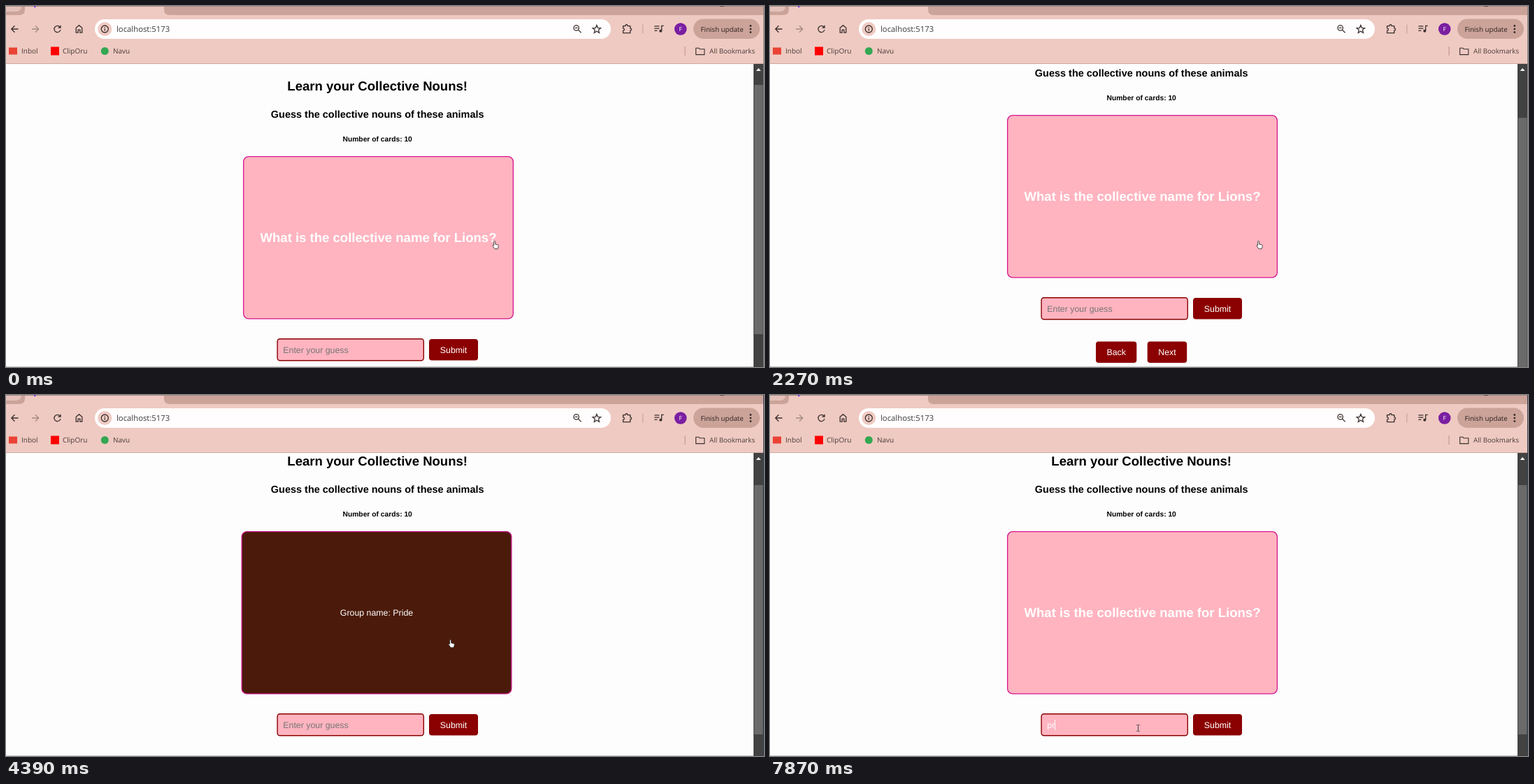
Animation, 1084 px wide and 517 px high, one loop 8 s. Source, as an HTML page:

```html
<!DOCTYPE html>
<html lang="en">
<head>
<meta charset="utf-8">
<title>Collective Nouns</title>
<style>
  html, body { margin: 0; width: 100%; height: 100%; overflow: hidden; background: #fdfdfd; }
  svg { display: block; width: 100vw; height: 100vh; text-rendering: geometricPrecision; }
  .page text { font: 12.37px "Liberation Sans", Arial, sans-serif; }
  .page .mid { text-anchor: middle; }
  .page .h2 { font-size: 18.56px; font-weight: bold; }
  .page .h3 { font-size: 14.48px; font-weight: bold; }
  .page .h5 { font-size: 10.27px; font-weight: bold; }
  .ui text { font: 10px "Open Sans", "Noto Sans", sans-serif; fill: #4a3b39; }
  .ui .url { font-size: 11.3px; fill: #3c3c3c; }
  .line { fill: none; stroke: #3b302f; stroke-width: 1.3; }
  .btn rect { fill: #8b0000; }
  .btn text { fill: #fff; }
</style>
</head>
<body>
<svg viewBox="0 0 1084 517" preserveAspectRatio="none">
  <defs>
    <clipPath id="view"><rect y="83" width="1069" height="434"/></clipPath>
  </defs>
  <rect width="1084" height="517" fill="#fdfdfd"/>

  <g class="page" clip-path="url(#view)">
    <g id="scroll">
      <text class="mid h2" x="531.2" y="121">Learn your Collective Nouns!</text>
      <text class="mid h3" x="531.2" y="160">Guess the collective nouns of these animals</text>
      <text class="mid h5" x="531.2" y="193.5">Number of cards: 10</text>

      <g id="card">
        <g id="front">
          <rect x="-191.6" y="215.6" width="385.7" height="232.3" rx="7.5" fill="#ffb4c0" stroke="#d6168f" stroke-width="1.3"/>
          <text class="mid h2" x="1.25" y="338" fill="#fff">What is the collective name for Lions?</text>
        </g>
        <g id="back">
          <rect x="-194.1" y="215.6" width="385.7" height="232.3" rx="7.5" fill="#4b1a0a" stroke="#c71585" stroke-width="1.3"/>
          <text class="mid" x="-1.25" y="335.8" fill="#fff">Group name: Pride</text>
        </g>
      </g>

      <rect x="388.1" y="476.7" width="209.2" height="31" rx="3.6" fill="#ffb4c0" stroke="#8b0000" stroke-width="1.4"/>
      <text id="hint" x="396.3" y="496.6" fill="#757575">Enter your guess</text>
      <text id="typed" x="396.3" y="496.6" fill="#fff"></text>
      <rect id="caret" y="485" width="1" height="15" fill="#fff"/>

      <g class="btn">
        <rect x="605" y="477" width="70" height="30.5" rx="4"/>
        <text class="mid" x="640" y="496.6">Submit</text>
        <rect x="466" y="539.5" width="58.3" height="30.5" rx="4"/>
        <text class="mid" x="495.2" y="559">Back</text>
        <rect x="539.7" y="539.5" width="56.5" height="30.5" rx="4"/>
        <text class="mid" x="568" y="559">Next</text>
      </g>
    </g>
  </g>

  <rect y="516" width="1069" height="1" fill="#c9c9c9"/>
  <rect x="1069" y="83" width="14" height="434" fill="#424242"/>
  <rect id="thumb" x="1070" width="12.5" height="357" fill="#6a6a6a"/>
  <path d="M1072.8 93l3.4-4 3.4 4z" fill="#fff"/>

  <g class="ui">
    <rect width="1084" height="82" fill="#efcac2"/>
    <rect y="82" width="1084" height="1" fill="#cdaaa4"/>
    <path d="M0 0h27v5q0 8-8 8H0z" fill="#cba399"/>
    <path d="M0 0h22q0 8-8 8H0z" fill="#e3c0b8"/>
    <path d="M226 0h858v13H234q-8 0-8-8z" fill="#cba399"/>
    <rect width="1084" height="1" fill="#a58a84"/>
    <rect x="40" width="2.5" height="2" fill="#7b3fe4"/>
    <rect x="1021" width="6" height="1" fill="#5b4b48"/>

    <path class="line" d="M17.5 33H8m4.5-4.7L7.8 33l4.7 4.7"/>
    <path class="line" d="M37 33h9.5m-4.5-4.7l4.7 4.7-4.7 4.7" style="stroke:#a58a85"/>
    <path class="line" d="M77.3 30.4a4.6 4.6 0 1 0 .7 3.8M78 27.8v3.4h-3.6"/>
    <path class="line" d="M100.2 38.2v-7l4.3-3.5 4.3 3.5v7h-2.9v-4h-2.8v4z"/>

    <rect x="127" y="19" width="738" height="28" rx="14" fill="#fffdfd"/>
    <circle cx="141.3" cy="33" r="10" fill="#efcac2"/>
    <circle class="line" cx="141.3" cy="33" r="5"/>
    <path class="line" d="M141.3 32.4v3.2m0-5.4v1.2"/>
    <text class="url" x="158" y="36.8">localhost:5173</text>
    <g class="line">
      <circle cx="815.6" cy="31.4" r="3.7"/>
      <path d="M818.4 34.2l4.2 4.2M813.7 31.4h3.8"/>
      <path d="M844.8 27.4l1.6 3.9 4.2.3-3.2 2.7 1 4.1-3.6-2.2-3.6 2.2 1-4.1-3.2-2.7 4.2-.3z"/>
      <path d="M882.5 28.7h3.2c0-2.6 3.4-2.6 3.4 0h3.6v3.2c2.4 0 2.4 3.3 0 3.3v3.5h-10.2v-3.3c2.4 0 2.4-3.5 0-3.5z"/>
      <path d="M927.3 28.9h7m-7 3.2h7m-7 3.2h4M937.6 35.4v-7h3"/>
    </g>
    <circle cx="936.2" cy="35.7" r="2" fill="#3b302f"/>
    <rect x="910.3" y="26.5" width="1" height="13" fill="#c69b92"/>
    <circle cx="964.7" cy="33" r="8.8" fill="#7a1fa2"/>
    <text x="964.7" y="36.2" text-anchor="middle" style="font-size:8.5px;fill:#fff">F</text>
    <rect x="983" y="18.5" width="95" height="28.5" rx="14.2" fill="#cba399"/>
    <text x="993.4" y="36.5" style="font-size:9.75px;fill:#2d2120">Finish update</text>
    <g fill="#2d2120">
      <circle cx="1064.8" cy="28.4" r="1.35"/><circle cx="1064.8" cy="33" r="1.35"/><circle cx="1064.8" cy="37.6" r="1.35"/>
    </g>

    <rect x="4" y="59.5" width="12" height="10" fill="#ea4335"/>
    <text x="22" y="68">Inbol</text>
    <rect x="64" y="58.5" width="12" height="12" fill="#f00"/>
    <text x="81" y="68">ClipOru</text>
    <circle cx="141.3" cy="64.5" r="5.5" fill="#34a853"/>
    <text x="153" y="68">Navu</text>
    <rect x="970.5" y="58" width="1" height="13" fill="#c08f86"/>
    <path class="line" d="M986.6 60.3h4.2l1.4 1.5h6.6v7.8h-12.2z" style="stroke-width:1.1"/>
    <text x="1006" y="68" style="font-size:9.75px">All Bookmarks</text>
  </g>
  <rect id="edge" x="1083" width="1" height="517"/>

  <path id="hand" fill="#fff" stroke="#222" stroke-width=".8" stroke-linejoin="round"
    d="M-1.4-5.4c.8 0 1.1.5 1.1 1.1v3.4l3.6.9c.8.2 1.1.7 1 1.5l-.5 2.5-.8 1.8H-1L-4 1.6c-.5-.8.4-1.5 1.1-1l.5.5v-5.4c0-.6.3-1.1 1-1.1z"/>
  <path id="beam" fill="none" stroke="#4d4245" stroke-width="1" d="M-2.3-4.5h1.6l.7.5.7-.5h1.6M0-4v8M-2.3 4.5h1.6l.7-.5.7.5h1.6"/>
</svg>
<script>
const LOOP = 8000, FLIP = 600;
const $ = id => document.getElementById(id);

// Each row: start time, then the value held from there on.
const scrolls = [[0, 0], [630, 3], [750, 9], [870, 18], [1020, 45], [1140, 61],
  [2270, 59], [2390, 48], [2510, 33], [2660, 20]];
const pointer = [[0, 700, 342], [3080, 668, 350], [3210, 637, 356], [5410, 575, 403],
  [5530, 552, 431], [5650, 540, 451], [5770, 533.5, 465], [5920, 527, 477], [6070, 526.5, 477]];
const carets = [[0, 0], [6210, 396], [6730, 0], [7230, 396], [7480, 403], [7870, 407]];
const typing = [[0, ""], [7480, "p"], [7870, "pr"]];
const turns = [[0, 0], ...[3910, 4030, 4150, 4270, 4390].map(t => [t, 180 * ease((t - 3778) / FLIP)]),
  ...[5270, 5410, 5530, 5650, 5770].map(t => [t, 180 - 180 * ease((t - 5176) / FLIP)])];

// CSS "ease": cubic-bezier(.25, .1, .25, 1)
function ease(x) {
  if (x <= 0) return 0;
  if (x >= 0.98) return 1;
  const curve = (a, b, u) => 3 * a * u * (1 - u) ** 2 + 3 * b * u * u * (1 - u) + u ** 3;
  let lo = 0, hi = 1;
  for (let i = 0; i < 30; i++) {
    const mid = (lo + hi) / 2;
    if (curve(0.25, 0.25, mid) < x) lo = mid; else hi = mid;
  }
  return curve(0.1, 1, lo);
}

function at(steps, t) {
  let row = steps[0];
  for (const s of steps) if (s[0] <= t) row = s;
  return row;
}

const set = (id, name, value) => $(id).setAttribute(name, value);
const show = (id, on) => set(id, "visibility", on ? "visible" : "hidden");

function draw(t) {
  const y = at(scrolls, t)[1];
  set("scroll", "transform", `translate(0 ${-y})`);
  set("thumb", "y", 113 + y * 0.8);

  const c = Math.cos(at(turns, t)[1] * Math.PI / 180);
  set("card", "transform", `translate(531.25 0) scale(${Math.abs(c)} 1)`);
  show("front", c > 0);
  show("back", c <= 0);

  const text = at(typing, t)[1], caret = at(carets, t)[1];
  $("typed").textContent = text;
  show("hint", !text);
  show("caret", caret);
  set("caret", "x", caret);

  const [, px, py] = at(pointer, t), beam = t >= 5770;
  for (const id of ["hand", "beam"]) set(id, "transform", `translate(${px} ${py})`);
  show("hand", !beam);
  show("beam", beam);
  set("edge", "fill", t < 3630 ? "#8d8583" : "#34424f");
}

const start = performance.now();
function tick() {
  draw((performance.now() - start) % LOOP);
  requestAnimationFrame(tick);
}
tick();
</script>
</body>
</html>
```
